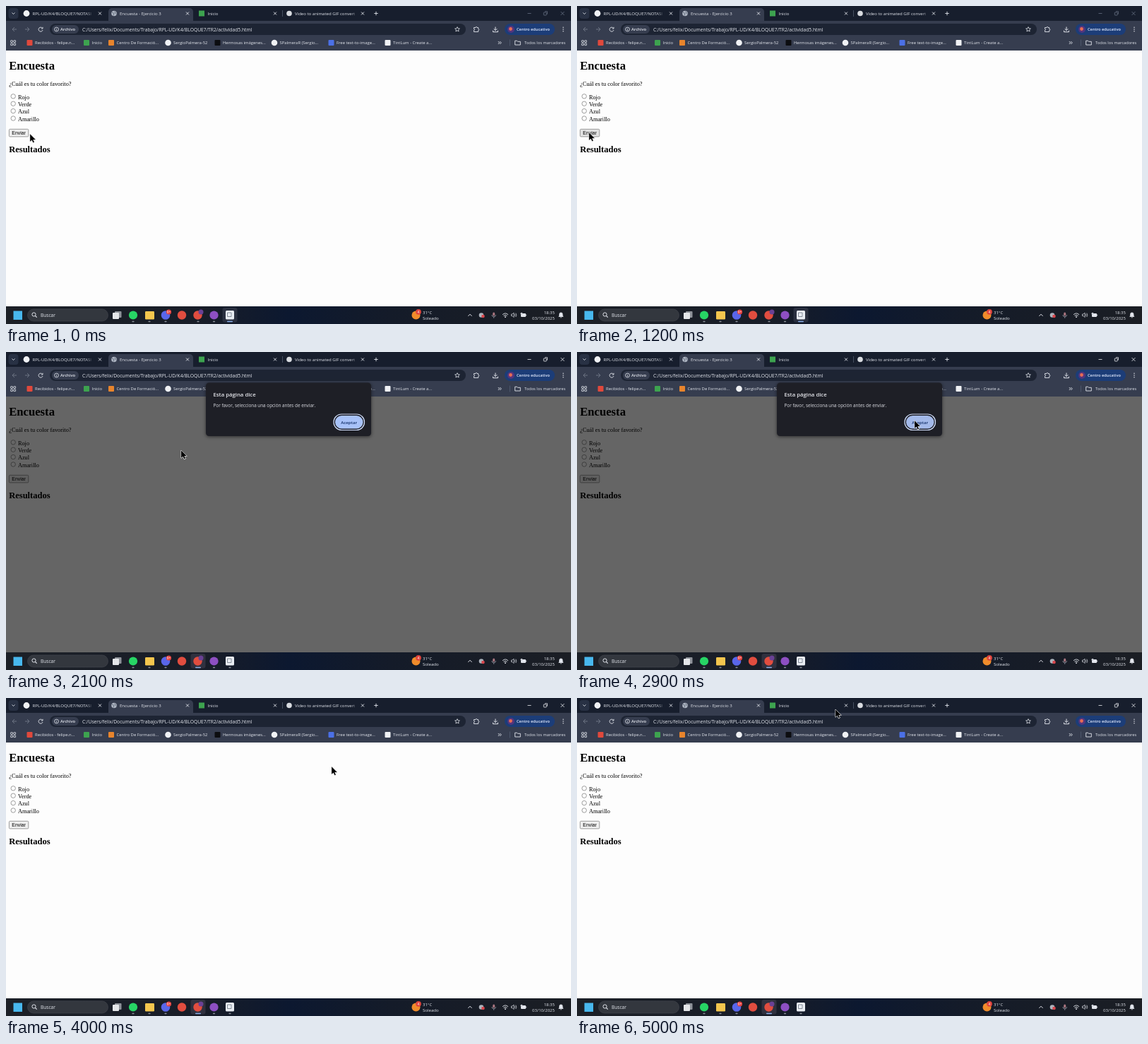
Write an HTML page with a canvas that moves like this. It is 800 px wide and 450 px high and loops after 5100 ms.

```html
<!DOCTYPE html>
<html lang="es">
<head>
<meta charset="utf-8">
<title>Encuesta</title>
<style>
html, body { margin: 0; width: 100%; height: 100%; overflow: hidden; background: #fdfdfd; }
canvas { display: block; width: 800px; height: 450px; }
</style>
</head>
<body>
<canvas id="stage" width="800" height="450"></canvas>
<script>
const ctx = document.getElementById('stage').getContext('2d');
const UI = '"Open Sans", "Noto Sans", sans-serif';
const SERIF = '"Liberation Serif", "Times New Roman", serif';
const ARIAL = '"Liberation Sans", Arial, sans-serif';
const LIGHT = '#e3e6ed';
const LOOP = 5100, STEP = 100, ALERT_ON = 1300, ALERT_OFF = 4000;

function text(str, x, y, size, color = LIGHT, { font = UI, weight = 400, align = 'left' } = {}) {
  ctx.font = `${weight} ${size}px ${font}`;
  ctx.textAlign = align;
  ctx.fillStyle = color;
  ctx.fillText(str, x, y);
}

function rect(x, y, w, h, color) {
  ctx.fillStyle = color;
  ctx.fillRect(x, y, w, h);
}

function box(x, y, w, h, r, fill, stroke, lineWidth = 0.8) {
  ctx.beginPath();
  ctx.roundRect(x, y, w, h, r);
  paint(fill, stroke, lineWidth);
}

function disc(x, y, r, fill, stroke, lineWidth = 0.8) {
  ctx.beginPath();
  ctx.arc(x, y, r, 0, Math.PI * 2);
  paint(fill, stroke, lineWidth);
}

function paint(fill, stroke, lineWidth) {
  if (fill) { ctx.fillStyle = fill; ctx.fill(); }
  if (stroke) { ctx.strokeStyle = stroke; ctx.lineWidth = lineWidth; ctx.stroke(); }
}

// Strokes SVG path data with its origin at (x, y).
function icon(x, y, d, color = LIGHT, lineWidth = 0.9, fill = null) {
  ctx.save();
  ctx.translate(x, y);
  const path = new Path2D(d);
  if (fill) { ctx.fillStyle = fill; ctx.fill(path); }
  ctx.strokeStyle = color;
  ctx.lineWidth = lineWidth;
  ctx.stroke(path);
  ctx.restore();
}

const CROSS = 'M-2 -2L2 2M2 -2L-2 2';
const CHEVRON = 'M-2 -1L0 1L2 -1';

function fadingTitle(str, x, end) {
  const fade = ctx.createLinearGradient(end - 14, 0, end, 0);
  fade.addColorStop(0, LIGHT);
  fade.addColorStop(1, 'rgba(227,230,237,0)');
  text(str, x, 13, 6.05, fade);
}

function drawTabs(focused) {
  rect(0, 0, 800, 22, '#171e2d');
  box(3.5, 3, 14, 15, 4, '#283144');
  icon(10.5, 10.5, CHEVRON);
  box(145, 3, 120, 22, [5, 5, 0, 0], '#363d4f');

  disc(29, 10.5, 4.4, '#f0f2f5');
  fadingTitle('RPL-UD/K4/BLOQUE7/NOTASI', 37.5, 126);
  disc(153, 10.5, 3.8, '#aeb5c2');
  icon(153, 10.5, 'M-3 -1.5L0 0L-1 3M1 -3L2 0L3 1', '#596273');
  text('Encuesta - Ejercicio 3', 161, 13, 6.05);
  rect(273, 6.5, 8, 8, '#3da34f');
  text('Inicio', 285.5, 13, 6.05);
  rect(391, 6, 0.8, 9, '#535c6d');
  disc(401, 10.5, 3.8, '#d8dbe0');
  fadingTitle('Video to animated GIF convert', 409, 501);
  for (const x of [133, 257, 381, 505]) icon(x, 10.5, CROSS);
  icon(524, 10.5, 'M-2.7 0H2.7M0 -2.7V2.7');

  const control = focused ? '#eceef2' : '#667083';
  icon(741, 10.5, 'M-2.5 0H2.5', control, 0.8);
  box(761.3, 9, 4, 4, 0.6, null, control);
  icon(763, 10.5, 'M0 -2.8H3.5V1', control, 0.7);
  icon(788, 10.5, 'M-2.5 -2.5L2.5 2.5M2.5 -2.5L-2.5 2.5', control, 0.8);
}

function drawToolbar() {
  rect(0, 21, 800, 42, '#363d4f');
  icon(12, 33, 'M3 0H-3M0 -3L-3 0L0 3', '#727a8a');
  icon(30, 33, 'M-3 0H3M0 -3L3 0L0 3', '#727a8a');
  icon(49, 33, 'M2.5 -1.7A3 3 0 1 0 3 1M3 -3.2V-1H0.8');

  box(62, 25, 589, 16, 8, '#1d2433');
  box(65, 27, 38, 12, 6, '#363d4f');
  disc(71.5, 33, 2.9, null, LIGHT);
  icon(71.5, 33, 'M0 -1.5V-0.7M0 -0.1V1.7', LIGHT, 0.8);
  text('Archivo', 77, 35.3, 5.8, LIGHT, { weight: 600 });
  text('C:/Users/felix/Documents/Trabajo/RPL-UD/K4/BLOQUE7/TR2/actividad5.html', 108, 35.6, 6.72);
  icon(639, 33, 'M0 -3.4L1 -1.2L3.4 -1L1.6 0.6L2.1 3L0 1.7L-2.1 3L-1.6 0.6L-3.4 -1L-1 -1.2Z', LIGHT, 0.8);
  icon(666, 33, 'M-3.5 -2.5H-1A1 1 0 0 1 1 -2.5H2.7V-0.6A1 1 0 0 1 2.7 1.5V3.5H-3.5V1.3A1 1 0 0 0 -3.5 -0.7Z');
  icon(693, 33, 'M0 -3.5V1.5M-2.3 -0.7L0 1.6L2.3 -0.7M-3.5 1.7V3.7H3.5V1.7', LIGHT, 1);

  box(706, 25, 71, 16, 8, '#1c3d78');
  disc(715, 33, 5, '#53357e');
  disc(714.5, 32.5, 2.4, '#e86b55');
  text('Centro educativo', 723, 35.2, 5.7, '#e4ecff', { weight: 600 });
  for (const dy of [-2.7, 0, 2.7]) disc(789, 33 + dy, 0.75, LIGHT);
}

function drawBookmarks() {
  for (const [dx, dy] of [[0, 0], [4.2, 0], [0, 4.2], [4.2, 4.2]]) {
    box(6.7 + dx, 48.7 + dy, 2.7, 2.7, 0.3, null, LIGHT, 0.8);
  }
  const size = 5.9, baseline = 54.2;
  const items = [
    ['Recibidos - felipe.n...', 41, '#e0493c', 'square'],
    ['Inicio', 121.5, '#3da34f', 'square'],
    ['Centro De Formació...', 156.5, '#e8842c', 'square'],
    ['SergioPalmera-52', 237, '#f0f2f5', 'disc'],
    ['Hermosas imágenes...', 307, '#0c0d10', 'square'],
    ['SPalmeraR (Sergio...', 387.5, '#f0f2f5', 'disc'],
    ['Free text-to-image...', 468, '#4b70e6', 'square'],
    ['TintLum - Create a...', 548, '#f0f2f5', 'square']
  ];
  for (const [label, x, color, shape] of items) {
    if (shape === 'disc') disc(x - 7.5, 52, 4.3, color);
    else box(x - 11.5, 48, 8, 8, 1, color);
    text(label, x, baseline, size);
  }
  icon(699, 52, 'M-2.2 -2L-0.2 0L-2.2 2M0.3 -2L2.3 0L0.3 2');
  rect(713, 47.5, 0.8, 9, '#566073');
  icon(724.5, 52, 'M-3.8 -2.8H-1L0 -1.7H3.8V3H-3.8Z');
  text('Todos los marcadores', 792.3, baseline, 5.74, LIGHT, { align: 'right' });
}

function drawPage(buttonHover) {
  const ink = '#000';
  rect(0, 63, 800, 362, '#fdfdfd');
  text('Encuesta', 4.2, 90, 16.67, ink, { font: SERIF, weight: 700 });
  text('¿Cuál es tu color favorito?', 4.2, 112.6, 8.33, ink, { font: SERIF });
  ['Rojo', 'Verde', 'Azul', 'Amarillo'].forEach((label, i) => {
    const y = 127.8 + i * 10.4;
    disc(10.2, y, 3.2, '#fff', '#767676', 0.7);
    text(label, 16.9, y + 3.7, 8.33, ink, { font: SERIF });
  });
  box(4.4, 174.3, 27.4, 10.6, 1.3, buttonHover ? '#e2e2e2' : '#efefef', '#767676', 0.7);
  text('Enviar', 18.1, 182, 6.94, ink, { font: ARIAL, align: 'center' });
  text('Resultados', 4.2, 206.6, 12.5, ink, { font: SERIF, weight: 700 });
}

function drawAlert(hover) {
  rect(0, 63, 800, 362, 'rgba(0,0,0,0.6)');
  ctx.save();
  ctx.shadowColor = 'rgba(0,0,0,0.55)';
  ctx.shadowBlur = 5;
  ctx.shadowOffsetY = 1;
  box(283, 43.5, 234, 75.5, 4.5, '#1e1f26');
  ctx.restore();
  text('Esta página dice', 293.5, 63.3, 7.75, '#e6e7ec', { weight: 600 });
  text('Por favor, selecciona una opción antes de enviar.', 293.5, 78.4, 6.37, '#dcdde3');
  box(464, 88, 43.5, 22.5, 11.2, null, '#d3e0fd', 1.2);
  box(466, 90, 39.5, 18.5, 9.2, hover ? '#a3b9e9' : '#a8c2f8');
  text('Aceptar', 485.7, 101.6, 6.1, '#122f68', { weight: 600, align: 'center' });
}

function drawApps(focused) {
  const active = focused ? 272 : 317;
  box(active - 10.5, 427, 21, 20.5, 3, focused ? '#30313f' : '#2a3040');

  rect(10.5, 431.5, 12.5, 12.5, '#48b8ee');
  box(30.5, 429, 114, 17, 8.5, '#33373e', '#454951', 0.6);
  disc(39.5, 436.5, 2.6, null, LIGHT, 1);
  icon(41.5, 438.5, 'M0 0L2.2 2.2', LIGHT, 1.1);
  text('Buscar', 49, 440, 6.6);

  box(154, 432, 9.5, 9, 1, '#8e9299');
  box(151, 434, 9, 9, 1, '#e4e6e9');
  disc(180, 437.5, 6.1, '#27d565');
  box(197, 432, 13, 11.5, 1.3, '#f4c64e');
  disc(226, 437.5, 6.3, '#5966ea');
  disc(230.5, 433, 3.6, '#e3413f');
  text('9+', 230.5, 434.7, 4.6, '#fff', { align: 'center' });
  disc(249, 437.5, 6.2, '#e14d3f');
  disc(271.5, 437.5, 6.2, '#e14d3f');
  disc(276, 433, 3.5, '#6a4195');
  disc(294.5, 437.5, 6.1, '#8d4fc2');
  box(311, 431, 12, 12.5, 1.5, '#e9edf3');
  icon(317, 437, 'M-3.5 -3H2V2.5H-3.5Z', '#6a7480', 0.8);

  for (const x of [180, 203, 226, 272, 294.5, 317]) {
    const half = x === active ? 4 : 1.6;
    box(x - half, 445.8, half * 2, 1.4, 0.7, x === active ? '#8ab0ea' : '#8b9099');
  }
}

function drawTray() {
  disc(580.5, 437.5, 6, '#f08c2b');
  disc(584, 432.8, 3.9, '#df443d');
  text('4', 584, 434.6, 5, '#fff', { align: 'center' });
  text('31°C', 590, 435.7, 6);
  text('Soleado', 590, 443.9, 6.1);

  icon(657, 437.5, 'M-2.6 1.3L0 -1.3L2.6 1.3', LIGHT, 1);
  disc(673, 437.5, 3.3, '#aeb4bd');
  disc(675.5, 439, 2.3, '#d8474d');
  box(689.2, 433.5, 3, 5, 1.5, '#a8757f');
  icon(690.7, 437, 'M-2.8 0A2.8 2.8 0 0 0 2.8 0M0 2.8V4.8', '#a8adb8', 0.7);
  icon(707, 439, 'M-4 -2.2Q0 -6 4 -2.2M-2.5 -0.5Q0 -3 2.5 -0.5', LIGHT, 0.9);
  disc(707, 440, 1, LIGHT);
  icon(718, 437.3, 'M-2.5 -1.2H-1L1 -3.2V3.2L-1 1.2H-2.5Z', LIGHT, 0.7);
  icon(720, 437.3, 'M0.3 -1.5Q1.5 0 0.3 1.5M1.8 -2.7Q3.8 0 1.8 2.7', LIGHT, 0.7);
  box(729, 435, 7, 5, 1, LIGHT);
  rect(736.3, 436.5, 0.8, 2, LIGHT);
  disc(730, 435.3, 1.5, '#cfd3da');

  text('18:35', 777, 435.7, 6.03, LIGHT, { align: 'right' });
  text('03/10/2025', 777, 443.9, 6.03, LIGHT, { align: 'right' });
  icon(785.8, 437.3, 'M-3 2.2L-2.2 0.7V-1.2A2.2 2.2 0 0 1 2.2 -1.2V0.7L3 2.2ZM-1 3.5H1', LIGHT, 0.8, LIGHT);
}

function drawTaskbar(focused) {
  const shade = ctx.createLinearGradient(0, 0, 800, 0);
  shade.addColorStop(0, '#1c2027');
  shade.addColorStop(0.35, '#181d28');
  shade.addColorStop(0.5, '#0c1830');
  shade.addColorStop(0.68, '#141b29');
  shade.addColorStop(1, '#1b1e24');
  rect(0, 425, 800, 25, shade);
  drawApps(focused);
  drawTray();
}

// Pointer waypoints: time, x, y.
const PATH = [
  [0, 34, 181], [300, 34, 181], [1000, 17, 179], [1200, 17, 179], [1300, 18, 181],
  [1600, 18, 181], [2600, 478, 97], [3900, 478, 97], [4000, 461, 97], [5000, 366, 16]
];

function pointerAt(t) {
  const next = PATH.findIndex(p => p[0] >= t);
  if (next <= 0) return PATH[0].slice(1);
  const [t0, x0, y0] = PATH[next - 1];
  const [t1, x1, y1] = PATH[next];
  const u = (t - t0) / (t1 - t0);
  const k = u * u * (3 - 2 * u);
  return [x0 + (x1 - x0) * k, y0 + (y1 - y0) * k];
}

function drawPointer(x, y) {
  icon(x, y, 'M0 0V11.2L2.6 8.9L4.3 12.8L6.3 11.9L4.6 8.2H8.2Z', '#fff', 1);
  icon(x, y, 'M0.2 0.5V10.6L2.7 8.5L4.5 12.2L5.8 11.6L4.1 7.9H7.6Z', '#000', 0.3, '#000');
}

function render(t) {
  const focused = t >= ALERT_ON;
  const alertOpen = focused && t < ALERT_OFF;
  const [x, y] = pointerAt(t);
  drawTabs(focused);
  drawToolbar();
  drawBookmarks();
  drawPage(!alertOpen && x < 32 && y > 174 && y < 185);
  if (alertOpen) drawAlert(x > 465 && x < 507 && y > 89);
  drawTaskbar(focused);
  drawPointer(x, y);
}

function tick() {
  const t = performance.now() % LOOP;
  render(Math.floor(t / STEP) * STEP);
  requestAnimationFrame(tick);
}
tick();
</script>
</body>
</html>
```
